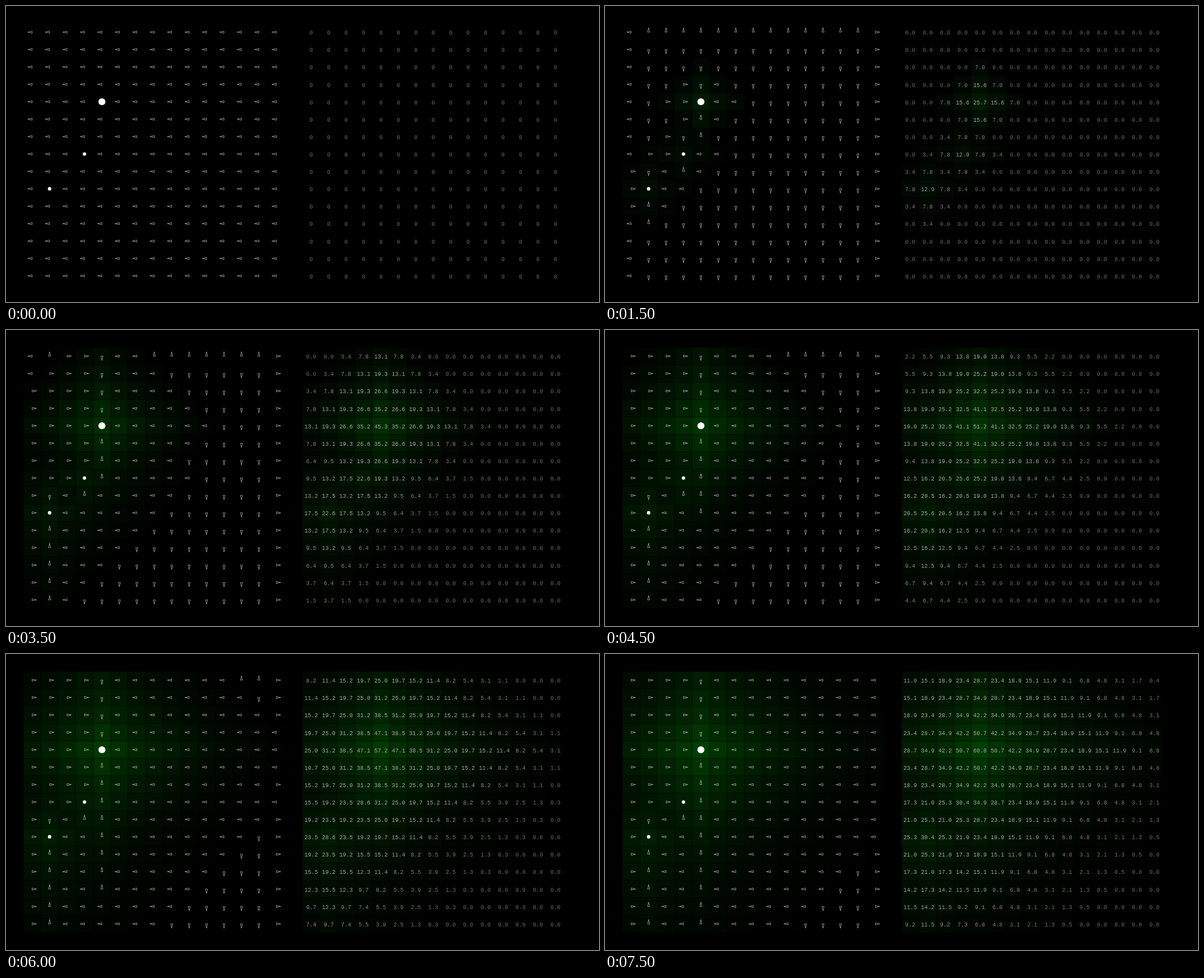
Recreate the animation shown at these times as an HTML page. Size 1058 px wide and 529 px high, loop 8 s.

```html
<!DOCTYPE html>
<html lang="en">
<head>
<meta charset="utf-8">
<title>Value iteration on a grid</title>
<style>
html, body { margin: 0; width: 100%; height: 100%; overflow: hidden; background: #000; }
svg { display: block; width: 100vw; height: 100vh; }
.cell { stroke: #000; stroke-width: 0.5; }
.arrow { fill: none; stroke: #fff; stroke-width: 0.55; stroke-linejoin: round; }
.goal { fill: #fff; }
text { font: 10px "Liberation Mono", "Courier New", monospace; text-anchor: middle; }
</style>
</head>
<body>
<svg id="stage" viewBox="0 0 1058 529"></svg>
<script>
const SIZE = 15, STEPS = 16, STEP_MS = 500;
const PITCH = 529 / 17;
const GAMMA = 0.85, MOVE_COST = 0.1;
const GOALS = [
  { row: 4, col: 4, reward: 10 },
  { row: 7, col: 3, reward: 5 },
  { row: 9, col: 1, reward: 5 }
];
// left, right, up, down as [dx, dy]; ties go to the earliest
const MOVES = [[-1, 0], [1, 0], [0, -1], [0, 1]];
const LEFT = 0, DOWN = 3;

const stage = document.getElementById("stage");
const goalAt = (row, col) => GOALS.find(g => g.row === row && g.col === col);
const inside = (row, col) => row >= 0 && col >= 0 && row < SIZE && col < SIZE;
const mid = i => (i + 1.5) * PITCH;

function add(name, attrs) {
  const el = document.createElementNS("http://www.w3.org/2000/svg", name);
  for (const key in attrs) el.setAttribute(key, attrs[key]);
  return stage.appendChild(el);
}

function sweep(prev) {
  return prev.map(({ value }, i) => {
    const row = Math.floor(i / SIZE), col = i % SIZE;
    const goal = goalAt(row, col);
    if (goal) return { value: goal.reward + GAMMA * value, dir: LEFT };
    const scores = MOVES.map(([dx, dy]) => inside(row + dy, col + dx)
      ? GAMMA * prev[i + dy * SIZE + dx].value - MOVE_COST : 0);
    const best = Math.max(0, ...scores);
    const dir = scores.indexOf(best);
    return { value: best, dir: dir < 0 ? DOWN : dir };
  });
}

const states = [Array.from({ length: SIZE * SIZE }, () => ({ value: 0, dir: LEFT }))];
while (states.length < STEPS) states.push(sweep(states[states.length - 1]));

function arrowPoints(x, y, [dx, dy]) {
  const half = PITCH / 17, len = PITCH / 4;
  return [
    [x + dy * half, y + dx * half],
    [x - dy * half, y - dx * half],
    [x + dx * len, y + dy * len]
  ].join(" ");
}

const addCell = (row, col) => add("rect", {
  class: "cell", x: (col + 1) * PITCH, y: (row + 1) * PITCH, width: PITCH, height: PITCH
});

// all backgrounds go below the arrows and labels
const fills = states[0].map((_, i) => {
  const row = Math.floor(i / SIZE), col = i % SIZE;
  return [addCell(row, col), addCell(row, col + 16)];
});

const cells = states[0].map((_, i) => {
  const row = Math.floor(i / SIZE), col = i % SIZE;
  const x = mid(col), y = mid(row), goal = goalAt(row, col);
  const arrow = goal ? null : add("polygon", { class: "arrow" });
  if (goal) add("circle", { class: "goal", cx: x, cy: y, r: PITCH * goal.reward / 50 });
  const label = add("text", { x: mid(col + 16), y: Math.floor(y) + 5 });
  return { x, y, arrow, label };
});

function render(step) {
  states[step].forEach(({ value, dir }, i) => {
    const { x, y, arrow, label } = cells[i];
    for (const f of fills[i]) f.setAttribute("fill", `rgb(0,${Math.round(value)},0)`);
    if (arrow) arrow.setAttribute("points", arrowPoints(x, y, MOVES[dir]));
    const grey = Math.round(Math.min(170, 105 + value * 4));
    label.setAttribute("fill", `rgb(${grey},${grey},${grey})`);
    label.textContent = step ? value.toFixed(1) : "0";
  });
}

let shown = -1;
function tick() {
  const step = Math.floor(performance.now() / STEP_MS) % STEPS;
  if (step !== shown) render(shown = step);
  requestAnimationFrame(tick);
}
tick();
</script>
</body>
</html>
```
